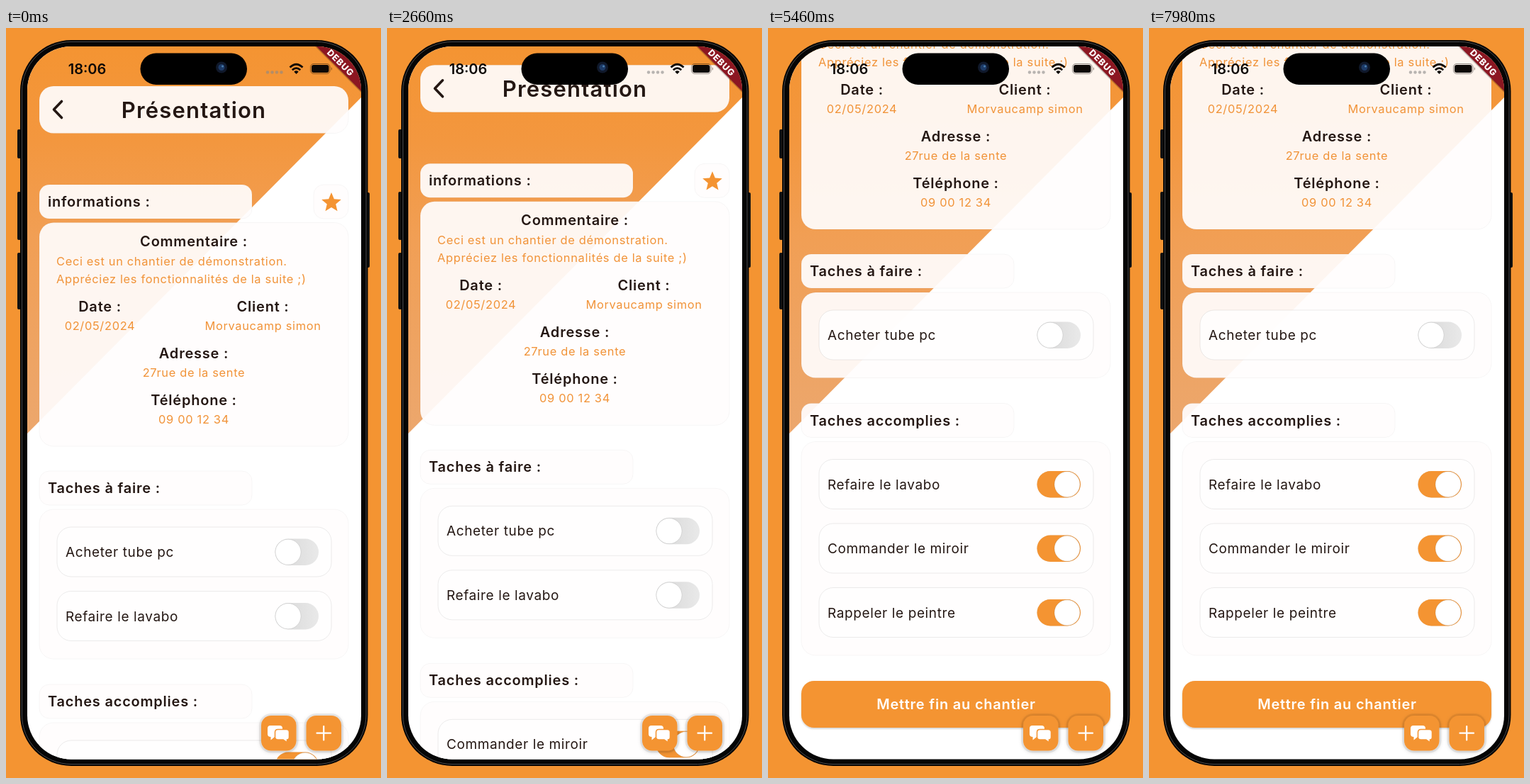
Animation of 529x1058 px, one loop 8 s. Source, as an HTML page:

```html
<!DOCTYPE html>
<html lang="fr">
<head>
<meta charset="utf-8">
<title>Présentation</title>
<style>
html, body { margin: 0; width: 100%; height: 100%; overflow: hidden; background: #f49432; }
svg { display: block; width: 529px; height: 1058px; }
text { font-family: Inter, Roboto, sans-serif; font-size: 19px; letter-spacing: .61px; fill: #241713; white-space: pre; }
.h { font-size: 20px; font-weight: 600; letter-spacing: .78px; }
.title { font-size: 31px; font-weight: 600; letter-spacing: 1.2px; }
.val { font-size: 16.4px; letter-spacing: .68px; fill: #f19338; }
.area { font-size: 19.7px; letter-spacing: .62px; fill: #d99257; }
.msg { font-size: 18.6px; letter-spacing: .58px; }
.mid { text-anchor: middle; }
.white { fill: #fff; }
.card { fill: #fffdfd; fill-opacity: .925; stroke: #000; stroke-opacity: .035; }
.item { fill: #fff; fill-opacity: .8; stroke: #000; stroke-opacity: .08; }
.or { fill: #f49432; }
</style>
</head>
<body>
<svg viewBox="0 0 529 1058" xmlns="http://www.w3.org/2000/svg">
  <defs>
    <clipPath id="screen"><rect x="30" y="26" width="471" height="1005.500" rx="62"/></clipPath>
    <linearGradient id="sky" x1="0" y1="0" x2="0" y2="1">
      <stop offset="0" stop-color="#f49432"/><stop offset=".25" stop-color="#f3973f"/>
      <stop offset=".5" stop-color="#f19f55"/><stop offset="1" stop-color="#eca76d"/>
    </linearGradient>
    <linearGradient id="off" x1="0" y1="0" x2="1" y2="0">
      <stop offset="0" stop-color="#d6d6d6"/><stop offset="1" stop-color="#e9e9e9"/>
    </linearGradient>
    <filter id="soft" x="-30%" y="-30%" width="160%" height="160%">
      <feDropShadow dx="0" dy="1" stdDeviation="3.200" flood-opacity=".24"/>
    </filter>
    <filter id="low" x="-10%" y="-20%" width="120%" height="150%">
      <feDropShadow dx="0" dy="1.5" stdDeviation="1" flood-opacity=".2"/>
    </filter>
  </defs>

  <rect width="529" height="1058" fill="#f49432"/>
  <g id="keys" fill="#111"></g>
  <rect x="20" y="17" width="490.500" height="1024" rx="72" fill="#050505"/>
  <rect x="22.500" y="19.500" width="485.500" height="1019" rx="69.500" fill="none" stroke="#4a4a4c" stroke-width="1"/>

  <g clip-path="url(#screen)">
    <rect x="30" y="26" width="471" height="1006" fill="#fff"/>
    <path d="M30 26H501V98L30 572Z" fill="url(#sky)"/>
    <g id="page"></g>
    <g id="fabs"></g>
    <rect id="dim" x="30" y="26" width="471" height="1006" opacity="0"/>
    <g id="edit" opacity="0"></g>
    <g id="chat" opacity="0"></g>
    <path d="M436 26H501V91Z" fill="#000" opacity=".25"/>
    <path d="M438 26H501V89Z" fill="#8c1722"/>
    <text class="mid white" transform="translate(472 49) rotate(45)" y="4.500" style="font-size:12.500px;font-weight:800;letter-spacing:.8px">DEBUG</text>
  </g>

  <text class="mid" x="114.500" y="64.500" style="font-size:20px;font-weight:600;letter-spacing:0;fill:#0c0806">18:06</text>
  <rect x="189.500" y="35.500" width="150.500" height="44.500" rx="22.250"/>
  <circle cx="304" cy="55.500" r="8" fill="#10192b"/>
  <circle cx="304" cy="55.500" r="4.500" fill="#1d3a66"/>
  <circle cx="305.500" cy="54" r="1.500" fill="#4b7fae"/>
  <g id="dots" fill="#888" fill-opacity=".6"></g>
  <g fill="none" stroke="#0c0806" stroke-width="2.800">
    <path d="M400.500 55.500Q409.500 47 418.500 55.500"/>
    <path d="M403.800 59.300Q409.500 54 415.200 59.300"/>
  </g>
  <path d="M406.300 61.700Q409.500 58.800 412.700 61.700L409.500 65Z" fill="#0c0806"/>
  <rect x="429.500" y="50.500" width="27.500" height="14" rx="4.500" fill="none" stroke="#0c0806" stroke-opacity=".45"/>
  <rect x="431" y="52" width="24.500" height="11" rx="3" fill="#0c0806"/>
  <path d="M458.800 55Q461 57.500 458.800 60Z" fill="#3a2614" opacity=".6"/>
</svg>
<script>
const $ = id => document.getElementById(id);
const rect = (x, y, w, h, r, attrs) => `<rect x="${x}" y="${y}" width="${w}" height="${h}" rx="${r}" ${attrs}/>`;
const text = (s, x, y, cls = '') => `<text x="${x}" y="${y}" class="${cls}">${s}</text>`;
const field = (name, value, x, y) => text(name, x, y, 'h mid') + text(value, x, y + 26, 'val mid');
const heading = (s, y) => rect(47, y, 300, 48, 14, 'class="card"') + text(s, 59, y + 31, 'h');

function task(name, y, on, id = '') {
  return `<g ${id && `id="${id}"`} transform="translate(0 ${y})">`
    + rect(72, 0, 387, 70, 20, 'class="item"') + text(name, 84, 42)
    + rect(379.500, 16.500, 61.500, 37.500, 18.750, 'fill="url(#off)"')
    + rect(379.500, 16.500, 61.500, 37.500, 18.750, `class="or on" opacity="${on}"`)
    + `<circle class="knob" cx="${398 + 24 * on}" cy="35.250" r="18" fill="#fff" stroke="#000" stroke-opacity=".1"/></g>`;
}

function star(cx, cy, r) {
  let d = '';
  for (let i = 0; i < 10; i++) {
    const a = Math.PI * (i / 5 - .5), k = i % 2 ? r * .45 : r;
    d += `${cx + k * Math.cos(a)},${cy + k * Math.sin(a)} `;
  }
  return `<polygon points="${d}" class="or"/>`;
}

$('keys').innerHTML = [[16, 143, 41], [16, 231, 68], [16, 317, 80], [508, 232, 106]]
  .map(([x, y, h]) => rect(x, y, 5, h, 2, '')).join('');
$('dots').innerHTML = [369, 375.500, 382, 388.500].map(x => `<circle cx="${x}" cy="62.500" r="2.200"/>`).join('');

$('page').innerHTML =
  rect(47, 82, 436, 66.500, 20, 'class="card"')
  + '<path d="M78.500 103.500L67.500 115L78.500 126.500" fill="none" stroke="#241713" stroke-width="3.600" stroke-linecap="round" stroke-linejoin="round"/>'
  + text('Présentation', 265, 126.500, 'title mid')
  + heading('informations :', 221)
  + rect(434, 221, 49, 48, 14, 'class="card"') + star(459, 246.500, 14.500)
  + rect(47, 274.500, 436, 315.500, 20, 'class="card"')
  + text('Commentaire :', 265, 308, 'h mid')
  + text('Ceci est un chantier de démonstration.', 71, 334.500, 'val')
  + text('Appréciez les fonctionnalités de la suite ;)', 71, 360, 'val')
  + field('Date :', '02/05/2024', 132.500, 400)
  + field('Client :', 'Morvaucamp simon', 362.500, 400)
  + field('Adresse :', '27rue de la sente', 265, 466)
  + field('Téléphone :', '09 00 12 34', 265, 532)
  + heading('Taches à faire :', 625)
  + rect(47, 679, 436, 211, 20, 'class="card" id="todoCard"')
  + task('Acheter tube pc', 704, 0)
  + '<g id="done">' + heading('Taches accomplies :', 926)
  + rect(47, 980, 436, 211, 20, 'class="card" id="doneCard"') + '</g>'
  + task('Refaire le lavabo', 794.500, 0, 'moving')
  + task('Commander le miroir', 1005, 1)
  + task('Rappeler le peintre', 1095.500, 1)
  + rect(47, 1227, 436, 66, 18, 'class="or" filter="url(#low)"')
  + text('Mettre fin au chantier', 265.500, 1267, 'h mid white');

$('fabs').innerHTML =
  [360, 423.500].map(x => rect(x - 3, 967, 55.500, 55.500, 17, 'opacity=".06"')
    + rect(x, 970, 49.500, 49.500, 14, 'class="or" filter="url(#soft)"')).join('')
  + '<path d="M373 984H386Q390 984 390 988V996Q390 1000 386 1000H379L373.500 1004.500V1000Q369 1000 369 996V988Q369 984 373 984Z" fill="#fff"/>'
  + '<path d="M383.500 989.500H395.500Q399.500 989.500 399.500 993.500V1000Q399.500 1004 396.500 1004V1008L391 1004H383.500Q379.500 1004 379.500 1000V993.500Q379.500 989.500 383.500 989.500Z" fill="#fff" stroke="#f49432" stroke-width="1.600"/>'
  + '<path d="M438.500 994.700H458M448.200 985V1004.500" stroke="#fff" stroke-width="2.200" stroke-linecap="round"/>';

$('edit').innerHTML =
  rect(54, 361, 421, 517.500, 20, 'fill="#fff"')
  + text('Modifiez le commentaire.', 265, 407, 'h mid')
  + rect(73, 463, 383.500, 299, 22, 'fill="none" stroke="#e2e2e4" stroke-width="2"')
  + ['Ceci est un chantier de', 'démonstration. Appréciez les', 'fonctionnalités de la suite ;)']
    .map((s, i) => text(s, 87, 488 + 29 * i, 'area')).join('')
  + rect(72, 787, 385, 66, 18, 'class="or" filter="url(#low)"')
  + text('Modifer', 265, 827, 'h mid white');

$('chat').innerHTML =
  rect(54, 94, 421, 482, 20, 'fill="#fff"')
  + text('Commentaires et historique :', 264.500, 139.500, 'h mid')
  + ['Commencement chantier', 'miroir commandé'].map((s, i) =>
    `<circle cx="96.500" cy="${219 + 72 * i}" r="24.200" class="or"/>`
    + `<text x="96.500" y="${227 + 72 * i}" class="h mid white" style="font-size:22px">BA</text>`
    + text(s, 133, 216 + 72 * i, 'msg')).join('')
  + rect(73, 498.800, 299, 63.500, 20, 'fill="none" stroke="#f0953c" stroke-width="2.500"')
  + '<text x="91" y="538.500" class="msg" style="fill:#dc9a63">votre commentaire</text>'
  + rect(391, 498, 66, 66, 18, 'class="or"')
  + '<path d="M438 517.500L411 530.500L419.500 534.500L432.500 523L422.500 536V544.500L427 538.500L432.500 541Z" fill="#fff"/>';

const LOOP = 8000, STEP = 70;
const ramp = (t, a, b) => Math.min(1, Math.max(0, (t - a) / (b - a)));
const smooth = p => p * p * (3 - 2 * p);
const fade = (t, a, b, c, d) => smooth(ramp(t, a, b)) * (1 - smooth(ramp(t, c, d)));

// Drag past the end of the list, hold, then spring back to its limit.
function scrollAt(t) {
  const end = 306, over = 47.400;
  if (t < 3360) {
    const p = ramp(t, 2590, 3150);
    return (end + over) * (p + smooth(p)) / 2;
  }
  const w = (t - 3360) / 100;
  return end + (w > 6.300 ? 0 : over * (1 + w) * Math.exp(-w));
}

function draw(time) {
  const t = Math.floor(time / STEP) * STEP;
  $('page').setAttribute('transform', `translate(0 ${-scrollAt(t)})`);

  const moved = t >= 4830, on = smooth(ramp(t, 4570, 4820)), item = $('moving');
  item.setAttribute('transform', `translate(0 ${moved ? 914.500 : 794.500})`);
  item.querySelector('.knob').setAttribute('cx', 398 + 24 * on);
  item.querySelector('.on').setAttribute('opacity', on);
  $('todoCard').setAttribute('height', moved ? 120.500 : 211);
  $('doneCard').setAttribute('height', moved ? 301.500 : 211);
  $('done').setAttribute('transform', `translate(0 ${moved ? -90.500 : 0})`);

  const edit = fade(t, 1000, 1250, 2100, 2380), chat = fade(t, 6180, 6430, 7350, 7650);
  $('edit').setAttribute('opacity', edit);
  $('chat').setAttribute('opacity', chat);
  $('dim').setAttribute('opacity', .195 * Math.max(edit, chat));
}

const start = performance.now();
function tick() {
  draw((performance.now() - start) % LOOP);
  requestAnimationFrame(tick);
}
tick();
</script>
</body>
</html>
```
